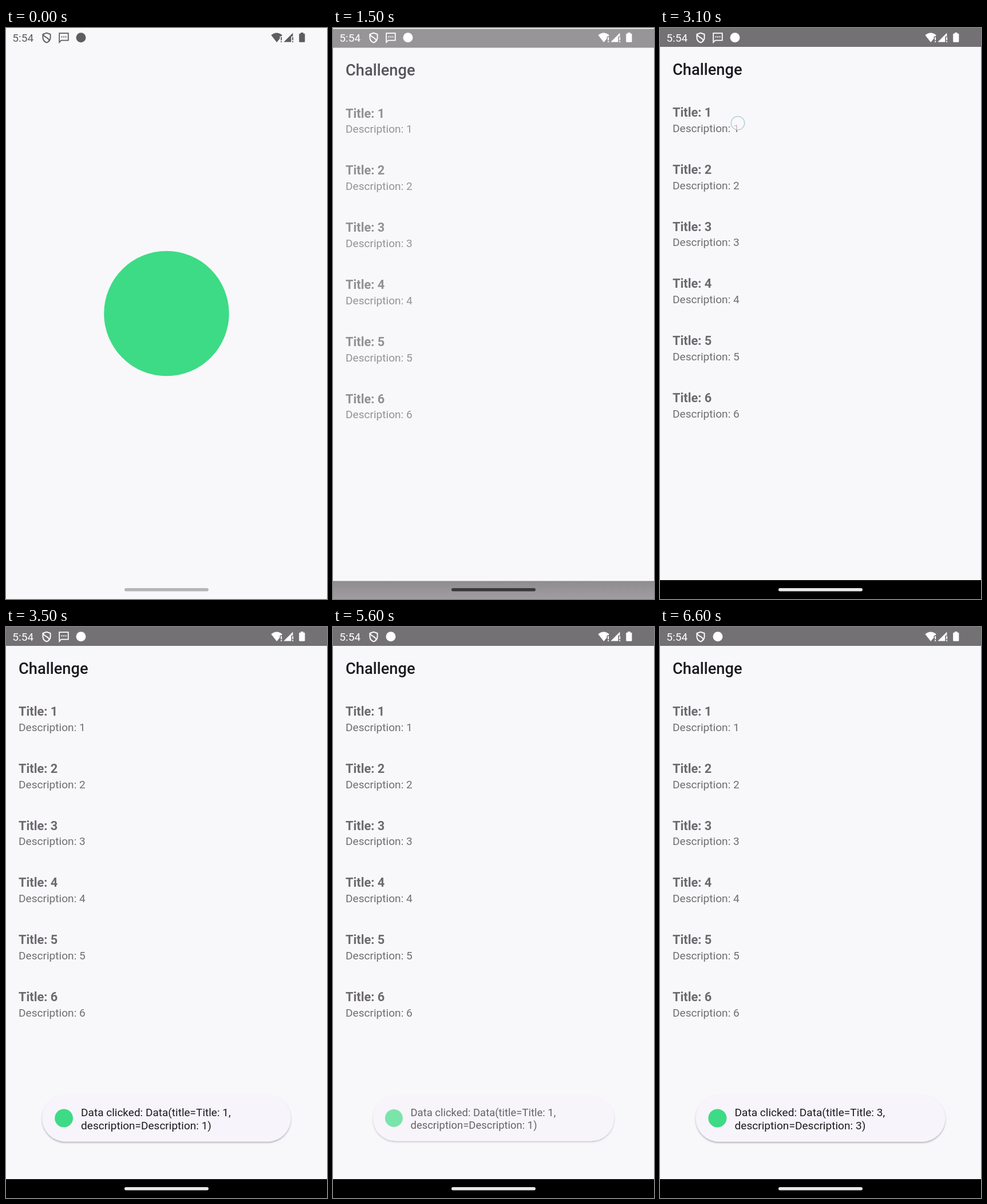
An HTML page for the animation above (8 s loop, 561 by 998 pixels).

```html
<!DOCTYPE html>
<html lang="en">
<head>
<meta charset="utf-8">
<title>List with toast</title>
<style>
  html, body { margin: 0; width: 100%; height: 100%; overflow: hidden; background: #f8f7fa; }
  svg { display: block; width: 100%; height: 100%; }
  text { font-family: Roboto, "Open Sans", sans-serif; font-size: 19.1px; }
  .heading { font-size: 27.3px; font-weight: 500; fill: #1b1b1f; }
  .title { font-size: 21.84px; font-weight: 700; fill: #6d6a6e; }
  .desc { fill: #716e72; }
  .toast text { fill: #1c1b1f; }
</style>
</head>
<body>
<svg viewBox="0 0 561 998">
  <defs>
    <linearGradient id="navFade" x1="0" y1="0" x2="0" y2="1">
      <stop offset="0" stop-color="#8e8c8e"/>
      <stop offset="1" stop-color="#a2a0a2"/>
    </linearGradient>
    <filter id="shadow" x="-5%" y="-20%" width="110%" height="150%">
      <feDropShadow dx="0" dy="2" stdDeviation="1.6" flood-color="#000" flood-opacity=".3"/>
    </filter>
  </defs>
  <rect width="561" height="998" fill="#f8f7fa"/>

  <circle id="splash" cx="280.5" cy="499" r="109.3" fill="#3ddb85"/>

  <g id="app">
    <rect width="561" height="33" fill="#747175"/>
    <text class="heading" x="22" y="81.5">Challenge</text>
    <g id="list"></g>
  </g>
  <rect id="nav" y="965" width="561" height="35"/>
  <rect id="pill" x="207" y="979" width="147" height="5.4" rx="2.7"/>

  <g id="status">
    <text x="11.3" y="24">5:54</text>
    <g fill="none" stroke="currentColor" stroke-width="1.9" stroke-linejoin="round">
      <path d="M71 8.6 L77.6 11 V16.5 C77.6 21 75 24 71 25.6 C67 24 64.4 21 64.4 16.5 V11 Z"/>
      <path d="M65 11.5 C66 16 75 17 75.5 22"/>
    </g>
    <g id="message">
      <path d="M93.2 25 V9.2 H108.8 V21.6 H96.4 Z" fill="none" stroke="currentColor" stroke-width="1.8"/>
      <path d="M96.6 14.4 h2 v2 h-2 z m3.5 0 h2 v2 h-2 z m3.5 0 h2 v2 h-2 z"/>
    </g>
    <circle id="badge" cx="131" cy="16.8" r="8.5"/>
    <path d="M473.2 25 L463.4 12.6 Q473 4.6 482.8 12.6 L481 14.8 H478.6 V18.4 Z"/>
    <path d="M485.4 24.6 L501.4 8.6 V14.8 H498.4 V24.6 Z"/>
    <path d="M480.2 16 h1.9 v5.6 h-1.9 z m0 7 h1.9 v1.9 h-1.9 z"/>
    <path d="M500.2 16 h1.9 v5.6 h-1.9 z m0 7 h1.9 v1.9 h-1.9 z"/>
    <path d="M515 8 h4.6 v1.8 h1.6 q1.2 0 1.2 1.2 v12.6 q0 1.2 -1.2 1.2 h-7.8 q-1.2 0 -1.2 -1.2 v-12.6 q0 -1.2 1.2 -1.2 h1.6 z"/>
  </g>

  <g id="toast" class="toast">
    <rect x="62.5" y="818" width="436" height="81.5" rx="40.75" fill="#f7f4fb" filter="url(#shadow)"/>
    <circle cx="100.4" cy="858.4" r="16" fill="#3ddb85"/>
    <text id="line1" x="130.5" y="855.4"></text>
    <text id="line2" x="130.5" y="877.6"></text>
  </g>
  <circle id="touch" r="11.7" fill="#faf9fb" fill-opacity=".62" stroke="#b4cfd0" stroke-width="1.5"/>
</svg>
<script>
  const LOOP = 8000, STEP = 100;
  const el = {};
  document.querySelectorAll("[id]").forEach(n => el[n.id] = n);

  const set = (node, attrs) => {
    for (const k in attrs) node.setAttribute(k, attrs[k]);
  };
  const show = (node, on) => set(node, { visibility: on ? "visible" : "hidden" });
  const ramp = (t, a, b) => Math.min(1, Math.max(0, (t - a) / (b - a)));
  const between = (t, a, b) => t >= a && t < b;
  const grey = v => `rgb(${v},${v},${v})`;

  // piecewise linear value through [time, value] points
  const track = (t, points) => {
    let v = points[0][1];
    for (let i = 1; i < points.length; i++) {
      const [a, from] = points[i - 1], [b, to] = points[i];
      if (t >= a) v = from + (to - from) * ramp(t, a, b);
    }
    return Math.round(v);
  };

  const PILL = [[0, 181], [700, 94], [1200, 94], [1500, 57], [1800, 57],
                [2100, 212], [2300, 220], [2800, 232]];

  let rows = "";
  for (let i = 0; i < 6; i++) {
    const y = 155 + i * 99.8;
    rows += `<text class="title" x="22" y="${y}">Title: ${i + 1}</text>` +
            `<text class="desc" x="22" y="${y + 26.8}">Description: ${i + 1}</text>`;
  }
  el.list.innerHTML = rows;

  function drawToast(t) {
    const second = t >= 6000;
    const start = second ? 6100 : 3100;
    const p = ramp(t, start, start + 500);
    const out = second ? 0 : ramp(t, 5500, 5800);
    const scale = 0.9 + 0.1 * (1 - (1 - p) ** 2) - 0.1 * out;
    const n = second ? 3 : 1;
    show(el.toast, p > 0 && out < 1);
    set(el.toast, {
      opacity: Math.min(1, p * 2) * (1 - out),
      transform: `translate(280.5 858.7) scale(${scale}) translate(-280.5 -858.7)`
    });
    el.line1.textContent = `Data clicked: Data(title=Title: ${n},`;
    el.line2.textContent = `description=Description: ${n})`;
  }

  function draw(t) {
    const opened = t >= 1500, entering = between(t, 1500, 1600);
    show(el.splash, !opened);
    show(el.app, opened);
    show(el.nav, opened);
    set(el.app, {
      opacity: entering ? 0.73 : 1,
      transform: `translate(0 ${entering ? 1.5 : 0})`
    });
    set(el.nav, { y: entering ? 966.5 : 965, fill: entering ? "url(#navFade)" : "#000" });
    set(el.pill, { fill: grey(track(t, PILL)) });

    const ink = opened ? "#fff" : t >= 1300 ? "#8b898b" : "#5f5c5f";
    set(el.status, { fill: ink, color: ink });
    const slide = ramp(t, 4000, 4500);
    set(el.message, { opacity: 1 - slide });
    set(el.badge, { cx: 131 - 30 * slide });

    const first = between(t, 3100, 3200);
    show(el.touch, first || between(t, 6000, 6200));
    set(el.touch, { cx: first ? 136 : 117, cy: first ? 166.3 : 345 });
    drawToast(t);
  }

  const origin = performance.now();
  function tick() {
    const t = (performance.now() - origin) % LOOP;
    draw(Math.floor(t / STEP) * STEP);
    requestAnimationFrame(tick);
  }
  tick();
</script>
</body>
</html>
```
